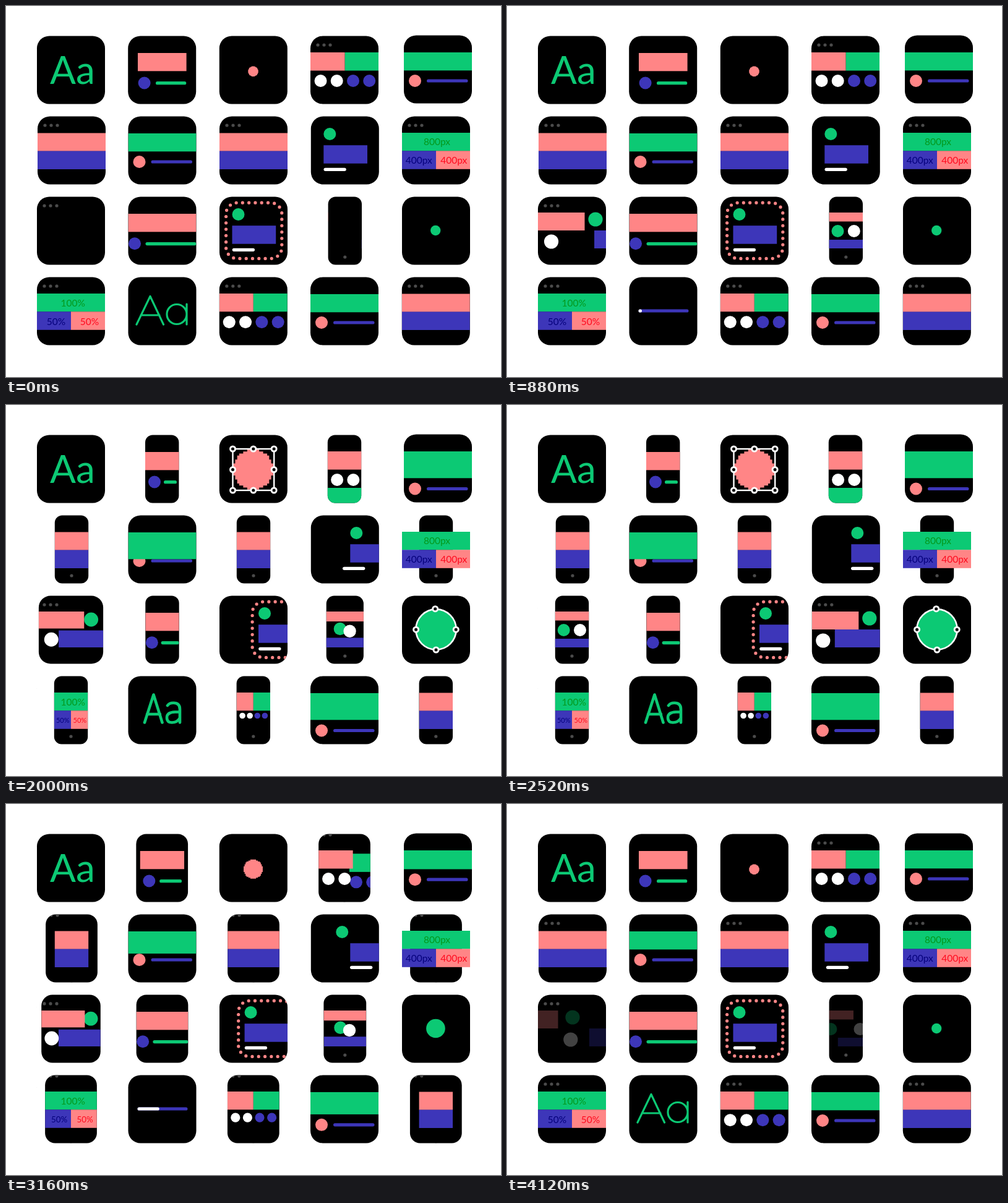
An HTML page for the animation above (4160 ms loop, 800x600 px).

```html
<!DOCTYPE html>
<html lang="en">
<head>
<meta charset="utf-8">
<title>Responsive tiles</title>
<style>
  html, body { margin: 0; width: 100%; height: 100%; overflow: hidden; background: #fff; }
  svg { display: block; width: 800px; height: 600px; font-family: Lato, "Open Sans", sans-serif; }
</style>
</head>
<body>
<svg id="stage" viewBox="0 0 800 600"></svg>
<script>
const LOOP = 4160, STEP = 40;
const GREEN = '#0cc974', PINK = '#ff8586', BLUE = '#3d36b9', WHITE = '#fff', GRAY = '#4b4b4b';
const SIZE = 110, PHONE = 54.4;
const stage = document.getElementById('stage');

const mix = (a, b, p) => a + (b - a) * p;
const ramp = (t, a, b) => {
  const p = Math.min(1, Math.max(0, (t - a) / (b - a)));
  return p * p * (3 - 2 * p);
};
const trip = (t, a, b, c, d) => ramp(t, a, b) - ramp(t, c, d);

const rect = (x, y, w, h, fill, r = 0) =>
  `<rect x="${x}" y="${y}" width="${Math.max(0, w)}" height="${h}" rx="${r}" fill="${fill}"/>`;
const disc = (x, y, r, fill) => `<circle cx="${x}" cy="${y}" r="${r}" fill="${fill}"/>`;
const bar = (x1, x2, y, color) => rect(x1, y - 2.6, x2 - x1, 5.2, color, 2.6);
const label = (text, x, y, color, size = 15.5) =>
  `<text x="${x}" y="${y + size * 0.36}" font-size="${size}" fill="${color}" text-anchor="middle">${text}</text>`;
const stroke = (d, width) =>
  `<path d="${d}" fill="none" stroke="${GREEN}" stroke-width="${width}" stroke-linecap="round" stroke-linejoin="round"/>`;
const fade = (opacity, body) => opacity > 0 ? `<g opacity="${opacity}">${body}</g>` : '';
const handle = (x, y) =>
  `<circle cx="${x}" cy="${y}" r="4" fill="#000" stroke="#fff" stroke-width="3"/>`;

// Rounded tile; narrow = 0 is a full square, 1 is a phone. Content is clipped to it.
let clipCount = 0;
function tile(x, y, narrow, draw = () => '') {
  const w = mix(SIZE, PHONE, narrow), left = x + (SIZE - w) / 2;
  const shape = rect(left, y, w, SIZE, '#000', mix(20, 12, narrow));
  const id = 'clip' + clipCount++;
  return `${shape}<clipPath id="${id}">${shape}</clipPath>` +
    `<g clip-path="url(#${id})">${draw(left, w, left + w)}</g>`;
}

// Browser dots leave upwards while the home button rises from below.
function chrome(x, y, swap) {
  const dots = [12, 22, 32].map(dx => disc(x + dx, y + 14.5 - 28 * swap, 2.6, GRAY)).join('');
  return dots + disc(x + SIZE / 2, y + 97.5 + 28 * (1 - swap), 2.6, GRAY);
}

function pixelDisc(cx, cy, r) {
  const n = 20, cell = 2 * r / n;
  let d = '';
  for (let i = 0; i < n; i++) {
    const v = (i + 0.5) / n * 2 - 1;
    const half = Math.round(Math.sqrt(1 - v * v) * n / 2) * cell;
    d += `M${cx - half} ${cy - r + i * cell}h${2 * half}v${cell + 0.1}h${-2 * half}z`;
  }
  return `<path d="${d}" fill="${PINK}"/>`;
}

function boxHandles(opacity) {
  let body = '<rect x="366.5" y="71" width="66.7" height="67" fill="none" stroke="#fff" stroke-width="2.4"/>';
  for (let i = 0; i < 3; i++)
    for (let j = 0; j < 3; j++)
      if (i !== 1 || j !== 1) body += handle(366.5 + i * 33.3, 71 + j * 33.5);
  return fade(opacity, body);
}

function ringHandles(opacity) {
  return fade(opacity,
    '<circle cx="695" cy="363" r="32.6" fill="none" stroke="#fff" stroke-width="2.6"/>' +
    handle(693.7, 329.7) + handle(727.2, 363.2) + handle(695, 396) + handle(662.6, 363.2));
}

// Image band with an avatar and a text line underneath.
function card(x, y, grow, flow) {
  const low = y + 73.5 + 14.5 * flow;
  return tile(x, y, 0, () =>
    disc(x + 18, low, 10, PINK) + bar(x + 37, x + 103.5, low, BLUE) +
    rect(x, y + 27.5, SIZE, 29.3 + 14 * grow, GREEN));
}

function stripes(x, y, narrow, fluid) {
  return tile(x, y, narrow, (left, w) => {
    const bandW = fluid || narrow < 0.002 ? w : PHONE;
    const bandX = x + (SIZE - bandW) / 2;
    return chrome(x, y, narrow) + rect(bandX, y + 27, bandW, 29.3, PINK) +
      rect(bandX, y + 56, bandW, 29.5, BLUE);
  });
}

function article(x, y, dx) {
  return disc(x + 30.5 + dx[0], y + 28.5, 10, GREEN) +
    rect(x + 20.5 + dx[1], y + 46.7, 70.7, 29.5, BLUE) +
    bar(x + 20.7 + dx[2], x + 57 + dx[2], y + 85.8, WHITE);
}

// Four blocks that slide in, rearrange between layouts and slide out.
function blocks(x, narrow, layout, enter, from, leave, to) {
  const y = 308.5, mid = x + SIZE / 2;
  const shift = i => from[i] * (1 - enter[i]) + to[i] * leave;
  const pinkW = x < 100 ? 55 : 66;
  const r = mix(11.6, 10, layout);
  return tile(x, y, narrow, (left, w, right) => {
    const blueX = mid + mix(-18, -36, layout) + shift(3);
    const top = mix(y + 54.5, y + 69.5, layout);
    return chrome(x, y, ramp(narrow, 0.25, 0.75)) + fade(1 - leave,
      disc(mid + mix(38, -13.3, layout) + shift(1), mix(345, 364, layout), r, GREEN) +
      rect(left + shift(0), y + 25.5, mix(75.5, pinkW, narrow), mix(29, 14.5, layout), PINK) +
      rect(blueX, top, right - blueX, 392 - top, BLUE) +
      disc(mid + mix(-37, 13, layout) + shift(2), mix(381, 364, layout), r, WHITE));
  });
}

function fontTile(t) {
  const thin = 'M211 515L233 469.5L254.5 515M218 500H248M292 482V515' +
    'M292 498.5a16 16 0 1 1-32 0a16 16 0 1 1 32 0';
  const condensed = 'M224 513.5L238.5 468.5L252.5 513.5M228 500H249' +
    'M261 486Q264 481.8 270.5 481.8Q281 481.8 281 492V513.5' +
    'M281 496.5H273Q260 497 260 505.5Q260 513.5 268 513.5Q277 513.5 281 506';
  const loading = (t >= 840 && t < 1480) || (t >= 2880 && t < 3520);
  let body;
  if (loading) {
    const p = t < 2000 ? ramp(t, 880, 1440) : ramp(t, 2920, 3480);
    body = bar(212.5, 293.5, 493, BLUE) + bar(212.5, mix(218, 293.5, p), 493, WHITE);
  } else {
    body = t >= 1480 && t < 2880 ? stroke(condensed, 4.6) : stroke(thin, 3.2);
  }
  return tile(197.5, 438.5, 0, () => body);
}

function draw(t) {
  clipCount = 0;
  const m = trip(t, 880, 1280, 2880, 3420);
  const grow = trip(t, 880, 1270, 2880, 3320);
  const handles = trip(t, 1280, 1560, 2640, 2880);
  const flip = trip(t, 1880, 2480, 2720, 3380);
  const layout = trip(t, 1880, 2480, 2640, 3300);
  const leave = ramp(t, 3800, 4280);
  const out = [];

  // Row 1
  out.push(tile(50, 48.5, 0, () =>
    `<text x="71" y="125.5" font-size="62" fill="${GREEN}">Aa</text>`));
  out.push(tile(197.2, 48.5, m, () => {
    const a = mix(213, 221, m);
    return rect(a, 76, mix(291.6, 284, m) - a, 29.3, PINK) +
      disc(mix(223.6, 240, m), 124.5, 10, BLUE) +
      bar(mix(242, 255, m), mix(291.3, 276, m), 124.7, GREEN);
  }));
  out.push(tile(344.8, 48.5, 0, () =>
    pixelDisc(399.5, mix(105.7, 104.3, grow), mix(8.2, 32.3, grow)) + boxHandles(handles)));
  out.push(tile(492, 48.5, m, left => {
    const drop = 59 * Math.pow(m, 3.2), push = 4 * m * (1 - m);
    return chrome(492, 48.5, m) +
      rect(mix(547.5, 519, m) + 21 * push, 75 + drop, 60, 29.5, GREEN) +
      rect(left, 75, 55.5, 29.5, PINK) +
      [0, 1].map(i => disc(left + mix(16.5, 15.3, m) + i * 26.2, 121, 10, WHITE) +
        disc(561 + i * 26.2 + 5 * push, 121 + drop, 10, BLUE)).join('');
  }));
  const early = trip(t, 880, 1270, 2880, 3220);
  out.push(card(643, 47.5, early, early));

  // Row 2
  out.push(stripes(51, 178.5, m, false));
  out.push(card(197.5, 178.5, m, 0));
  out.push(stripes(345, 178.5, m, true));
  out.push(tile(492.8, 178.5, 0, () => article(492.8, 178.5, [
    43 * trip(t, 880, 1280, 2940, 3360),
    43 * trip(t, 1320, 1720, 3320, 3740),
    42.5 * trip(t, 1740, 2140, 3760, 4180)
  ])));
  out.push(tile(640, 178.5, m, () => chrome(640, 178.5, m)));
  out.push(rect(640, 205, SIZE, 29.5, GREEN) + rect(640, 234.3, 55, 29.5, BLUE) +
    rect(695, 234.3, 55, 29.5, PINK) + label('800px', 696.5, 219.7, '#05981d') +
    label('400px', 667.2, 249, '#05007c') + label('400px', 723.8, 249, '#ff0a1e'));

  // Row 3
  out.push(blocks(50, flip, layout,
    [ramp(t, 160, 560), ramp(t, 340, 760), ramp(t, 560, 920), ramp(t, 760, 1120)],
    [-76, -105, 104, 73], leave, [-58, -50, 47, 62]));
  out.push(tile(197.5, 308.5, m, (left, w, right) =>
    rect(left, 336, w, 29.3, PINK) + disc(left + 10.5, 384.3, 10, BLUE) +
    bar(left + mix(28, 25.3, m), right, 384.6, GREEN)));
  out.push(tile(345, 308.5, 0, () => {
    const dx = 42.5 * m;
    return article(345, 308.5, [dx, dx, dx]) +
      `<rect x="${355.6 + dx}" y="318.2" width="90.2" height="90.2" rx="18" fill="none" stroke="${PINK}"
        stroke-width="5.2" stroke-linecap="round" pathLength="32" stroke-dasharray="0 1" stroke-dashoffset=".15"/>`;
  }));
  out.push(blocks(492.8, 1 - flip, 1 - layout,
    [ramp(t, 160, 480), ramp(t, 280, 600), ramp(t, 400, 720), ramp(t, 520, 840)],
    [-66, -25, 25, 63], leave, [-36, -15, 13, 31]));
  out.push(tile(640, 308.5, 0, () =>
    disc(mix(694.2, 695, grow), 363, mix(8.2, 32, grow), GREEN) + ringHandles(handles)));

  // Row 4
  out.push(tile(50, 438.5, m, (left, w, right) => {
    const size = mix(15.5, 11, m);
    return chrome(50, 438.5, m) + rect(left, 465, w, 29.5, GREEN) +
      rect(left, 494.3, w / 2, 29.5, BLUE) + rect(105, 494.3, w / 2, 29.5, PINK) +
      label('100%', 108.2, 480.5, '#05981d') +
      label('50%', mix(81, 91.7, m), 510, '#05007c', size) +
      label('50%', mix(135, 119.3, m), 510, '#ff0a1e', size);
  }));
  out.push(fontTile(t));
  out.push(tile(344.8, 438.5, m, (left, w) =>
    chrome(344.8, 438.5, m) + rect(left, 465, w / 2, 29.3, PINK) +
    rect(left + w / 2, 465, w / 2, 29.3, GREEN) +
    [WHITE, WHITE, BLUE, BLUE].map((c, i) =>
      disc(400.2 + (i - 1.5) * mix(26.3, 12.1, m), mix(511.2, 502.5, m), mix(10, 4.8, m), c)).join('')));
  out.push(card(492, 438.5, m, m));
  out.push(stripes(639.8, 438.5, m, false));

  stage.innerHTML = out.join('');
}

let shown = -1;
const start = performance.now();
function tick() {
  const t = Math.floor(((performance.now() - start) % LOOP) / STEP) * STEP;
  if (t !== shown) draw(shown = t);
  requestAnimationFrame(tick);
}
tick();
</script>
</body>
</html>
```
